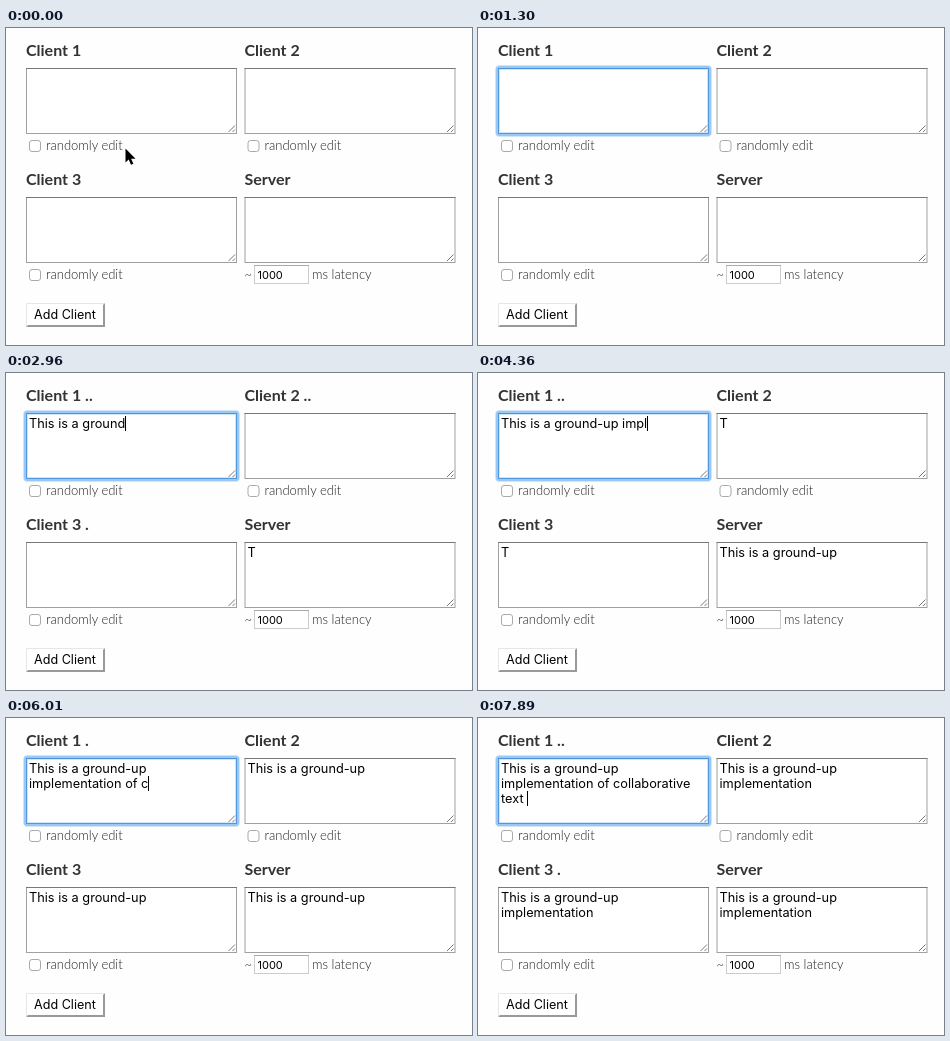
Write an HTML page that moves like this. It is 466 by 317 pixels and loops after 8 s.

```html
<!DOCTYPE html>
<html lang="en">
<head>
<meta charset="utf-8">
<title>Collaborative editing</title>
<style>
  html, body { margin: 0; width: 100%; height: 100%; overflow: hidden; background: #fefefe; }
  svg { position: absolute; left: 0; top: 0; }
  .head { font: 700 16px Lato, sans-serif; fill: #333; }
  .label { font: 300 13px Lato, sans-serif; fill: #222; }
  .ui { font: 12.6px Inter, sans-serif; }
  .num { font: 11px Inter, sans-serif; }
  .text {
    position: absolute; width: 205px; font: 12.75px/15px Inter, sans-serif;
    color: #000; white-space: pre-wrap;
  }
  #caret { position: relative; }
  #caret::after {
    content: ""; position: absolute; left: 0; bottom: 0;
    width: 1px; height: 15px; background: #000;
  }
  #c1:empty + i { display: none; }
</style>
</head>
<body>
<svg width="466" height="317" viewBox="0 0 466 317">
  <defs>
    <g id="area">
      <rect x=".5" y=".5" width="210" height="65" fill="#fff" stroke="#a0a0a0"/>
      <path d="M0 .5H211" stroke="#777"/>
      <use href="#grip"/>
    </g>
    <path id="grip" d="M202.5 64L209 57.5M206.5 64L209 61.5" stroke="#777" fill="none"/>
    <g id="check">
      <rect x=".5" y=".5" width="11" height="11" rx="2.5" fill="#fff" stroke="#aaa"/>
      <text class="label" x="17" y="10">randomly edit</text>
    </g>
  </defs>

  <text class="head" id="h1" x="20" y="28">Client 1</text>
  <text class="head" id="h2" x="238.5" y="28">Client 2</text>
  <text class="head" id="h3" x="20" y="157">Client 3</text>
  <text class="head" x="238.5" y="157">Server</text>

  <use href="#area" x="20" y="40"/>
  <use href="#area" x="238.5" y="40"/>
  <use href="#area" x="20" y="169"/>
  <use href="#area" x="238.5" y="169"/>

  <g id="focus" fill="none" stroke="#4a98e8">
    <rect x="19.5" y="39.5" width="212" height="67" rx="2" stroke-width="5" opacity=".25"/>
    <rect x="19.5" y="39.5" width="212" height="67" rx="1.5" stroke-width="3" opacity=".4"/>
    <rect x="20.5" y="40.5" width="210" height="65" opacity=".8"/>
  </g>

  <use href="#check" x="23" y="112"/>
  <use href="#check" x="241.5" y="112"/>
  <use href="#check" x="23" y="241"/>

  <text class="label" x="238.5" y="251">~</text>
  <rect x="248.5" y="237.5" width="54" height="18" fill="#fff" stroke="#ccc"/>
  <path d="M248 237.5H303" stroke="#aaa"/>
  <text class="num" x="251.5" y="251">1000</text>
  <text class="label" x="306" y="251">ms latency</text>

  <rect x="20" y="275" width="79" height="24" fill="#fff"/>
  <path d="M20.5 298V275.5H98" fill="none" stroke="#e6e6e6"/>
  <path d="M20 299L22 297H97V277L99 275V299Z" fill="#999"/>
  <text class="ui" x="28" y="291">Add Client</text>

  <path id="arrow" d="M0 0V14L3.2 11L5.5 16.3L7.9 15.3L5.6 10.2H10Z" stroke="#fff" stroke-width="1.2" paint-order="stroke"/>
  <path id="beam" d="M0 .5H2L3.5 2L5 .5H7M3.5 2V14M0 15.5H2L3.5 14L5 15.5H7M2 10.5H5" fill="none" stroke="#222"/>
</svg>
<div class="text" style="left:23px;top:43px"><span id="c1"></span><span id="caret"></span></div>
<div class="text" id="c2" style="left:241.5px;top:43px"></div>
<div class="text" id="c3" style="left:23px;top:172px"></div>
<div class="text" id="server" style="left:241.5px;top:172px"></div>

<script>
  const LOOP = 8000, TICK = 117.5, TYPING = 1774;
  const full = "This is a ground-up implementation of collaborative text ";
  const $ = id => document.getElementById(id);

  // [tick, characters typed]
  const typed = [[0, 1], [6, 11], [7, 11], [10, 16], [11, 16], [20, 23], [21, 23],
    [22, 24], [28, 31], [36, 39], [41, 45], [42, 45], [43, 46], [52, 57]];

  // When each copy holds 1, 19 and 34 characters
  const arrivals = {
    server: [2130, 4360, 6130],
    c2: [4010, 5660, 7770],
    c3: [3660, 5420, 7770]
  };
  const lengths = [0, 1, 19, 34];

  // Waiting dots: [time, count]
  const dots = {
    h1: [[2490, 1], [2840, 2], [3190, 3], [3540, 0], [3770, 1], [4120, 2], [4480, 3], [4830, 0],
      [5190, 1], [5540, 0], [5890, 1], [6240, 2], [6600, 3], [6950, 0], [7300, 1], [7660, 2]],
    h2: [[2490, 1], [2840, 2], [3190, 3], [3540, 0], [3890, 1], [4010, 0], [4710, 1], [5070, 2],
      [5420, 3], [5660, 0], [6130, 1], [6480, 2], [6830, 3], [7190, 0], [7540, 1], [7770, 0]],
    h3: [[2960, 1], [3310, 2], [3660, 0], [4830, 1], [5190, 2], [5420, 0],
      [6480, 1], [6830, 2], [7190, 3], [7540, 0], [7890, 1]]
  };

  const pointer = [[0, "arrow", 119.5, 120.5], [120, "arrow", 114.5, 113.5], [240, "arrow", 110.5, 107.5],
    [600, "beam", 99, 77], [950, "beam", 310, 210], [1070, "none", 0, 0]];

  const last = (list, t) => list.filter(e => e[0] <= t).pop();

  function setText(id, s) {
    const el = $(id);
    if (el.textContent !== s) el.textContent = s;
  }

  function typedCount(t) {
    if (t < TYPING) return 0;
    const k = Math.floor((t - TYPING) / TICK);
    const i = typed.findIndex(e => e[0] > k);
    if (i < 0) return full.length;
    const [k0, n0] = typed[i - 1], [k1, n1] = typed[i];
    return Math.floor(n0 + (n1 - n0) * (k - k0) / (k1 - k0));
  }

  function draw(t) {
    setText("c1", full.slice(0, typedCount(t)));
    for (const id in arrivals)
      setText(id, full.slice(0, lengths[arrivals[id].filter(a => a <= t).length]));
    for (const id in dots) {
      const n = (last(dots[id], t) || [0, 0])[1];
      setText(id, "Client " + id[1] + (n ? " " + ".".repeat(n) : ""));
    }

    const focused = t >= 710;
    $("focus").style.display = focused ? "" : "none";
    $("caret").style.display = focused && (t < 1300 || t >= TYPING) ? "" : "none";

    const [, shape, x, y] = last(pointer, t);
    for (const id of ["arrow", "beam"]) {
      $(id).style.display = id === shape ? "" : "none";
      $(id).setAttribute("transform", `translate(${x} ${y})`);
    }
  }

  const start = performance.now();
  function frame() {
    draw((performance.now() - start) % LOOP);
    requestAnimationFrame(frame);
  }
  draw(0);
  requestAnimationFrame(frame);
</script>
</body>
</html>
```
